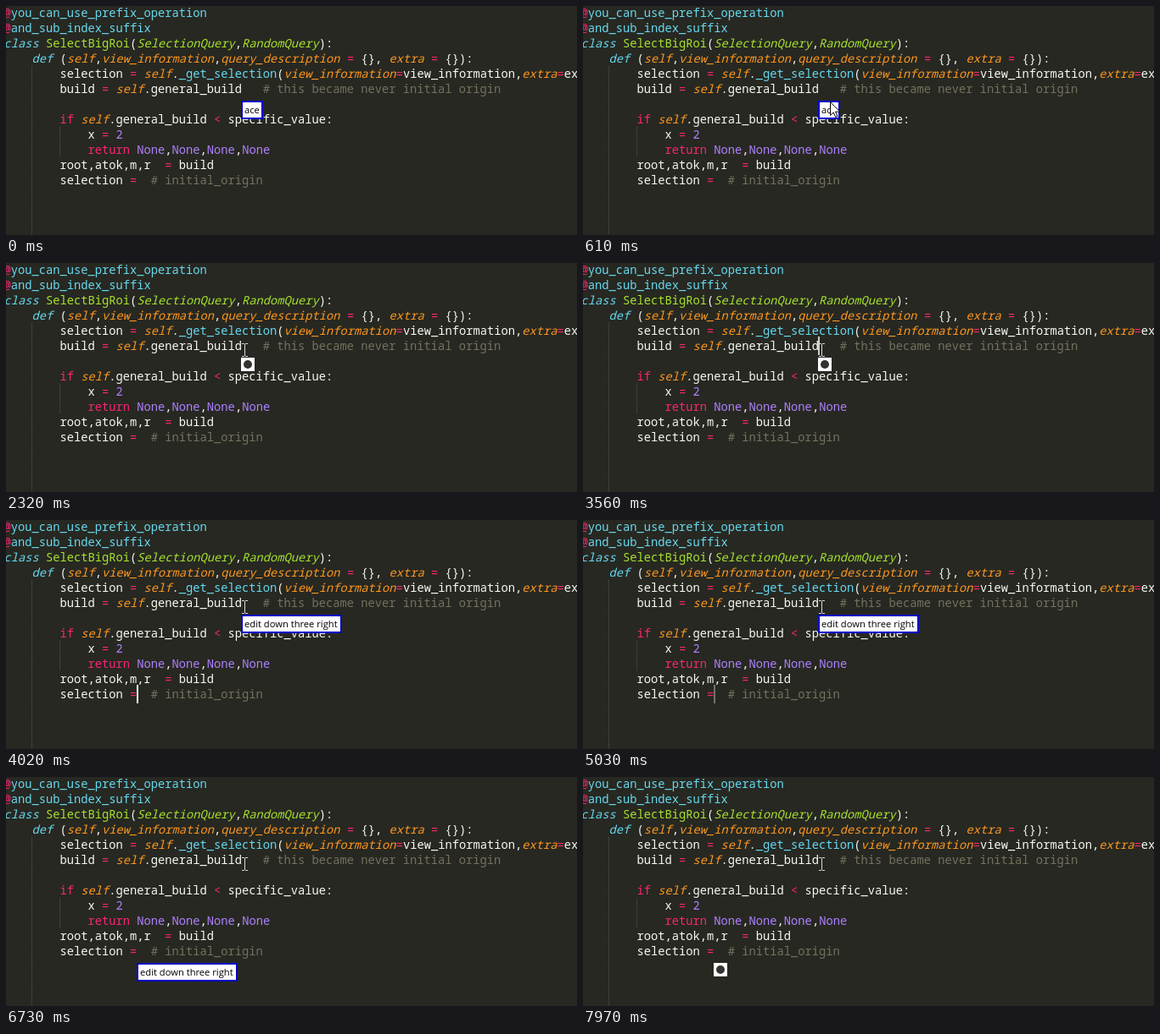
These frames come from a looping animation (673 px wide and 271 px high, 8 s). An HTML page:

```html
<!DOCTYPE html>
<html lang="en">
<head>
<meta charset="utf-8">
<title>Voice editing</title>
<style>
html, body { margin: 0; width: 673px; height: 271px; overflow: hidden; background: #272822; }
#stage { position: relative; width: 673px; height: 271px; overflow: hidden; }
#stage > * { position: absolute; }

pre {
  left: -2.5px; top: -1px; margin: 0; color: #f8f8f2;
  font: 500 13.75px/18px "Noto Sans Mono", "DejaVu Sans Mono", monospace;
  font-variant-ligatures: none;
}
pre * { font-style: normal; }
b { color: #f92672; font-weight: inherit; }
i { color: #66d9ef; }
u { color: #a6e22e; text-decoration: none; }
s { color: #ae81ff; text-decoration: none; }
q { color: #75715e; quotes: none; font-weight: 400; }
em { color: #fd971f; }
pre em, pre .it { font-style: italic; }

.guide { width: 1px; background: repeating-linear-gradient(#55564e 0 1px, transparent 1px 2px); }

.caret { width: 2px; height: 22px; background: #f8f8f0; animation: 8s linear infinite; }
.tip {
  box-sizing: border-box; height: 22px; padding-left: 2px;
  border: 2px solid #0000c8; background: #fff; color: #000;
  font: 11.2px/18px "Open Sans", "Noto Sans", sans-serif; white-space: nowrap;
}
.icon { width: 16px; height: 16px; background: #fff; }
.icon::after {
  content: ""; position: absolute; left: 3px; top: 3px;
  width: 10px; height: 10px; border-radius: 50%; background: #33342f;
}
.near { left: 277px; top: 112px; }
.low { left: 154px; top: 220px; }
.switch { animation: 8s step-end infinite; }

#mouse { left: 0; top: 0; animation: move 8s linear infinite; }
#mouse svg { position: absolute; left: 0; top: 0; overflow: visible; }

/* Percentages are milliseconds / 80 */
@keyframes caretA {
  0%, 14.49% { opacity: 0; }
  14.5%, 22.1% { opacity: 1; }
  24.2%, 30% { opacity: 0; }
  32%, 34.9% { opacity: 1; }
  36.8%, 42.6% { opacity: 0; }
  45%, 47.87% { opacity: 1; }
  47.88%, 100% { opacity: 0; }
}
@keyframes caretB {
  0%, 47.87% { opacity: 0; }
  47.88%, 55.2% { opacity: 1; }
  57.1%, 62.1% { opacity: 0; }
  64.3%, 67.7% { opacity: 1; }
  69.6%, 76% { opacity: 0; }
  77.6%, 80.2% { opacity: 1; }
  82.1%, 88.6% { opacity: 0; }
  90.2%, 92.7% { opacity: 1; }
  94.6%, 100% { opacity: 0; }
}
@keyframes word { 0% { opacity: 1; } 29% { opacity: 0; } 100% { opacity: 0; } }
@keyframes iconA { 0% { opacity: 0; } 29% { opacity: 1; } 45.5% { opacity: 0; } 100% { opacity: 0; } }
@keyframes phraseA { 0% { opacity: 0; } 45.5% { opacity: 1; } 84.1% { opacity: 0; } 100% { opacity: 0; } }
@keyframes phraseB { 0% { opacity: 0; } 84.1% { opacity: 1; } 85.25% { opacity: 0; } 100% { opacity: 0; } }
@keyframes iconB { 0% { opacity: 0; } 85.25% { opacity: 1; } 100% { opacity: 1; } }
@keyframes click { 0% { opacity: 0; } 14.5% { opacity: 1; } 17.375% { opacity: 0; } 100% { opacity: 0; } }
@keyframes beam { 0% { opacity: 0; } 0.875% { opacity: 1; } 6.6% { opacity: 0; } 8.7% { opacity: 1; } 100% { opacity: 1; } }
@keyframes arrow { 0% { opacity: 0; } 6.6% { opacity: 1; } 8.7% { opacity: 0; } 100% { opacity: 0; } }
@keyframes move {
  0%, 0.875% { transform: translate(462px, 188px); animation-timing-function: ease-out; }
  7.6%, 8.6% { transform: translate(291px, 113px); }
  11.6%, 100% { transform: translate(281px, 103px); }
}
</style>
</head>
<body>
<div id="stage">
<div class="guide" style="left:30px;top:71px;height:200px"></div>
<div class="guide" style="left:63px;top:143px;height:36px"></div>
<pre><b>@</b><i>you_can_use_prefix_operation</i>
<b>@</b><i>and_sub_index_suffix</i>
<i class="it">class</i> <u>SelectBigRoi</u>(<u class="it">SelectionQuery</u>,<u class="it">RandomQuery</u>):
    <i class="it">def</i> (<em>self</em>,<em>view_information</em>,<em>query_description</em> <b>=</b> {}, <em>extra</em> <b>=</b> {}):
        selection <b>=</b> <em>self</em>.<i>_get_selection</i>(<em>view_information</em><b>=</b>view_information,<em>extra</em><b>=</b>extra
        build <b>=</b> <em>self</em>.general_build   <q># this became never initial origin</q>

        <b>if</b> <em>self</em>.general_build <b>&lt;</b> specific_value:
            x <b>=</b> <s>2</s>
            <b>return</b> <s>None</s>,<s>None</s>,<s>None</s>,<s>None</s>
        root,atok,m,r  <b>=</b> build
        selection <b>=</b>  <q># initial_origin</q></pre>

<div class="caret" style="left:277px;top:87px;animation-name:caretA"></div>
<div class="caret" style="left:154px;top:195px;animation-name:caretB"></div>

<div class="tip near switch" style="width:26px;animation-name:word">ace</div>
<div class="icon near switch" style="animation-name:iconA"></div>
<div class="tip near switch" style="width:119px;animation-name:phraseA">edit down three right</div>
<div class="tip low switch" style="width:119px;animation-name:phraseB">edit down three right</div>
<div class="icon low switch" style="animation-name:iconB"></div>

<svg class="switch" style="left:267px;top:90px;animation-name:click" width="24" height="24">
  <circle cx="12" cy="12" r="11" fill="none" stroke="#fff" stroke-width="1.5"/>
</svg>
<div id="mouse">
  <svg class="switch" style="animation-name:beam" width="1" height="1">
    <path d="M-3-8h3v1h-3zM1-8h3v1h-3zM0-7h1v14h-1zM-3 7h3v1h-3zM1 7h3v1h-3z" fill="#d8d7dd"/>
  </svg>
  <svg class="switch" style="animation-name:arrow" width="1" height="1">
    <path d="M.5.7V16.5L4.2 13L6.7 18.5L9 17.5L6.6 12.1H11.8Z" fill="#fff" stroke="#000"/>
  </svg>
</div>
</div>
</body>
</html>
```
